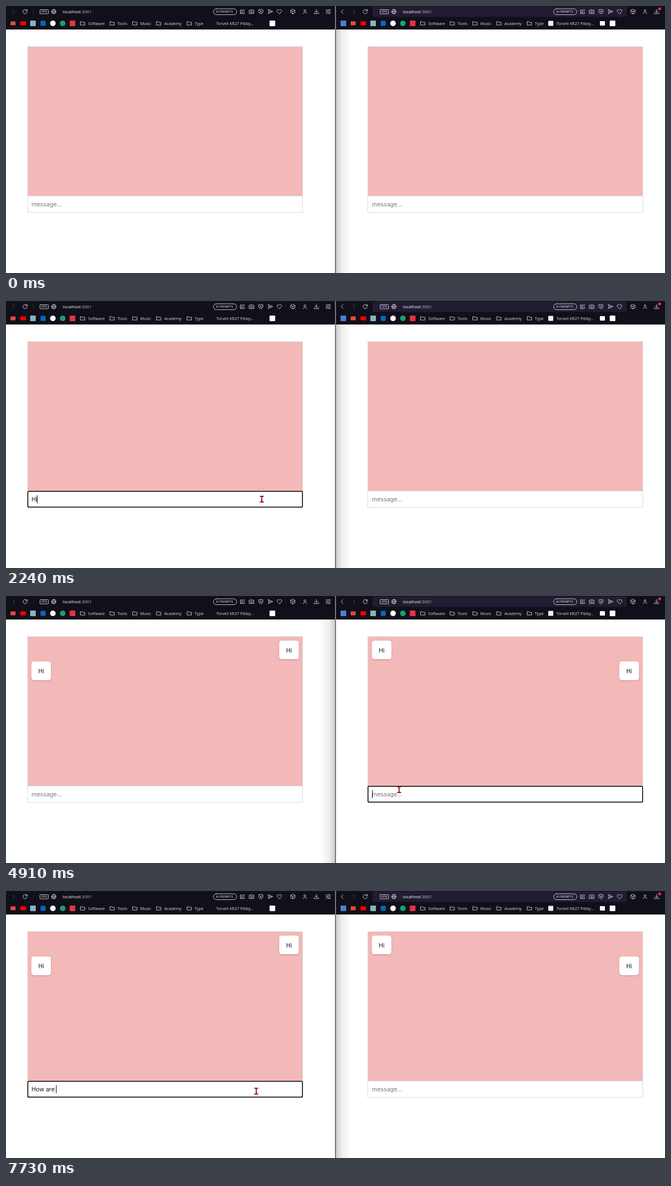
Recreate the animation shown at these times as an HTML page. Size 1174 px wide and 477 px high, loop 8 s.

```html
<!DOCTYPE html>
<html lang="en">
<head>
<meta charset="utf-8">
<title>Chat in two windows</title>
<style>
html, body { margin: 0; width: 100%; height: 100%; overflow: hidden; background: #fff; }
svg { display: block; }
text { white-space: pre; }
.ui { font: 7.2px "Open Sans", "Noto Sans", sans-serif; fill: #dcdbe2; }
.url { font-size: 7.7px; fill: #fff; }
.tag { font: 5px Inter, sans-serif; fill: #e4e3ea; }
.chat { font: 10.5px Inter, sans-serif; fill: #1c1c1c; }
.icon { fill: none; stroke: #d2d1d9; stroke-width: .9; stroke-linecap: round; stroke-linejoin: round; }
.field { fill: #fff; stroke: #dcdcdc; }
</style>
</head>
<body>
<svg id="stage" width="1174" height="477" viewBox="0 0 1174 477">
  <defs>
    <linearGradient id="fade">
      <stop offset="0" stop-color="#000" stop-opacity=".2"/>
      <stop offset=".4" stop-color="#000" stop-opacity=".07"/>
      <stop offset="1" stop-color="#000" stop-opacity="0"/>
    </linearGradient>
    <filter id="soft" x="-20%" y="-20%" width="140%" height="150%">
      <feDropShadow dx="0" dy="1" stdDeviation=".8" flood-opacity=".25"/>
    </filter>
  </defs>
</svg>
<script>
const LOOP = 8000, GAP = 606, TEXT_GAP = 606.5, BLINK = 530;
const stage = document.getElementById('stage');
const $ = id => document.getElementById(id);

const icon = (x, y, d, extra = '') => `<path class="icon" transform="translate(${x} ${y})" d="${d}" ${extra}/>`;
const label = (x, y, s, cls = 'ui') => `<text class="${cls}" x="${x}" y="${y}">${s}</text>`;
const square = (x, color, w = 10, h = w) =>
  `<rect x="${x - w / 2}" y="${31 - h / 2}" width="${w}" height="${h}" rx="1" fill="${color}"/>`;
const dot = (x, color) => `<circle cx="${x}" cy="31" r="5" fill="${color}"/>`;
const folder = (x, name, tx) =>
  icon(x, 31, 'M0 2.5V-3H3L4 -1.8H8V3H.5Z') + label(tx, 33.5, name);

function toolbar() {
  return icon(34, 10, 'M3.5 -1.6A3.8 3.8 0 1 0 3.8 .6M3.8 -4V-1.4H1.2') +
    '<rect class="icon" x="60.5" y="6.5" width="15" height="7.5" rx=".8"/>' +
    label(62.6, 12.2, 'VPN', 'tag') +
    icon(85, 10, 'M-4 0A4 4 0 1 1 4 0A4 4 0 1 1 -4 0H4M0 -4C-2.4 -2 -2.4 2 0 4C2.4 2 2.4 -2 0 -4') +
    label(101, 13, 'localhost<tspan fill="#bdbcc6">:3001</tspan>', 'ui url') +
    '<rect class="icon" x="369.5" y="5" width="41.5" height="10.5" rx="5.2"/>' +
    label(374, 12.1, 'AI PROMPTS', 'tag') +
    icon(421, 10, 'M-.5 -3H-3.5V3.5H3.5V1M-1.5 1.5L-1 -.5L2.5 -4L4 -2.5L.5 1Z') +
    icon(437.5, 10, 'M-4 -2.4H-2L-1.2 -3.6H1.2L2 -2.4H4V3.4H-4ZM-1.7 .4A1.7 1.7 0 1 1 1.7 .4A1.7 1.7 0 1 1 -1.7 .4') +
    icon(454, 10, 'M-3.6 -3.2L0 -4L3.6 -3.2V1Q3 3 0 4Q-3 3 -3.6 1ZM-1.4 -1.4L1.4 1.4M1.4 -1.4L-1.4 1.4') +
    icon(471, 10, 'M-4 -3.6L4.2 0L-4 3.6L-2.6 0ZM-2.6 0H1') +
    icon(487, 10, 'M0 4L-3.6 .4C-5.6 -2.5 -2 -5.4 0 -2.4C2 -5.4 5.6 -2.5 3.6 .4Z') +
    icon(511, 10, 'M0 -4.2L3.8 -2.2V2.2L0 4.2L-3.8 2.2V-2.2ZM-3.8 -2.2L0 0L3.8 -2.2M0 0V4.2') +
    icon(532.5, 10, 'M-1.7 -1.6A1.7 1.7 0 1 1 1.7 -1.6A1.7 1.7 0 1 1 -1.7 -1.6M-3 3.6C-3 .4 3 .4 3 3.6') +
    icon(553, 10, 'M0 -4V1.4M-2.3 -.7L0 1.5L2.3 -.7M-4 1.6V3.7H4V1.6') +
    icon(12, 10, 'M0 -3.5L3.5 0L0 3.5', 'style="stroke:#55535f"') +
    square(12.5, '#e34a3e', 9, 7) + square(30.5, '#f00', 10, 7) + square(48, '#86b4bd') +
    square(66, '#0a66c2', 9) + dot(83.5, '#fff') + dot(101, '#1c9f6c') + square(118.5, '#e5333f', 10) +
    folder(132.5, 'Software', 146.3) + folder(185, 'Tools', 198.5) + folder(225.5, 'Music', 239) +
    folder(268, 'Academy', 282) + folder(322.5, 'Type', 336) +
    label(374.5, 33.5, 'Torvell KR27 Pibby...') + square(474.5, '#fff', 10);
}

const bubble = (id, x, y) => `<g id="${id}" transform="translate(${x} ${y})">
  <rect width="34.7" height="33.2" rx="4.5" fill="#fff" filter="url(#soft)"/>
  <text class="chat" x="17.3" y="20.8" text-anchor="middle">Hi</text></g>`;

const panel = (side, dx, tx) => `
  <rect x="${38.5 + dx}" y="72.5" width="490" height="267" fill="#f3b8b8" stroke="#dcdcdc"/>
  <rect id="field${side}" class="field" x="${38.5 + dx}" y="339.5" width="490" height="29.2"/>
  <rect id="ring${side}" x="${38.9 + dx}" y="339.9" width="489.2" height="28.4" rx="1.8" fill="#fff" stroke="#000" stroke-width="1.5"/>
  <text id="text${side}" class="chat" x="${45.5 + tx}" y="358"></text>
  <rect id="caret${side}" y="347" width="1" height="14.5" fill="#111"/>`;

stage.insertAdjacentHTML('beforeend', `
  <rect width="1174" height="477" fill="#fff"/>
  <rect id="shadeR" x="588" y="42" width="26" height="435" fill="url(#fade)"/>
  <rect id="shadeL" x="-586" y="42" width="26" height="435" fill="url(#fade)" transform="scale(-1 1)"/>
  <rect width="1174" height="42" fill="#110f19"/>
  <rect x="653" y="1" width="453" height="18.5" rx="2.5" fill="#211c31"/>
  <path d="M48.5 6V14M498.5 6V14" stroke="#211f2b"/>
  ${toolbar()}
  ${icon(574, 10, 'M-4 -3H4M-4 0H4M-4 3H4M2 -3.8V-2.2M-2 -.8V.8M1.5 2.2V3.8')}
  <g transform="translate(${GAP} 0)">${toolbar()}</g>
  ${icon(600.5, 10, 'M0 -3.5L-3.5 0L0 3.5')}
  <circle cx="1164.5" cy="5" r="2.6" fill="#f0323c"/>
  ${square(601, '#4a7fd6')}${square(970.5, '#eee', 9)}${square(1062.5, '#fff', 9, 8)}
  <rect x="586" width="2" height="477" fill="#77767b"/>
  ${panel('L', 0, 0)}${panel('R', GAP, TEXT_GAP)}
  ${bubble('sentL', 486.8, 79.8)}${bubble('gotR', 45.3 + TEXT_GAP, 79.8)}
  ${bubble('gotL', 45.3, 117)}${bubble('sentR', 486.8 + GAP, 117)}
  <g id="mouse">
    <circle id="click" r="9.3" fill="#fcf04c" fill-opacity=".88"/>
    <path id="arrow" d="M.5 0V10.6L2.9 8.5L4.7 12.2L6.8 11.2L5 7.7H8Z" fill="#e5080c" stroke="#1a0000" stroke-width=".9"/>
    <path id="beam" d="M-3.5 -5.2H3.5M0 -5.2V5.2M-3.5 5.2H3.5" fill="none" stroke-width="1.8"/>
  </g>`);

// Typed text per field: [time, content]
const typing = {
  L: [[0, ''], [2110, 'H'], [2240, 'Hi'], [2500, ''], [6580, 'H'], [6860, 'Ho'], [7050, 'How'],
      [7190, 'How '], [7330, 'How a'], [7460, 'How ar'], [7590, 'How are'], [7730, 'How are ']],
  R: [[0, ''], [4240, 'H'], [4440, 'Hi'], [4910, '']]
};
const focus = [[0, ''], [1370, 'L'], [3450, 'R'], [5850, 'L']];
const blinkStarts = [1370, 2110, 2240, 3450, 4240, 4440, 5850, 6580, 6860, 7050, 7190, 7330, 7460, 7590, 7730];
const clicks = [[1370, 1510], [3450, 3510], [5850, 5920]];

// Pointer moves: start, step length, step count, waypoints [progress, x, y]
const moves = [
  [390, 65.5, 13, [[0, 1112, 468], [.32, 915, 442], [.75, 559, 394.7], [.84, 515, 381], [.92, 486, 370], [1, 468, 359.5]]],
  [1240, 65, 2, [[0, 459, 355], [1, 455.7, 354]]],
  [3110, 67, 5, [[0, 480, 353], [.5, 606, 349], [1, 700.3, 346]]],
  [5580, 67, 4, [[0, 655, 348], [.5, 530, 353], [1, 445.8, 357.5]]]
];

const latest = (list, t) => list.filter(k => k[0] <= t).pop();

function pointer(t) {
  const move = latest(moves, t);
  if (!move) return null;
  const [start, step, count, way] = move;
  const p = Math.min(Math.floor((t - start) / step), count - 1) / (count - 1);
  const i = Math.max(1, way.findIndex(w => w[0] >= p));
  const a = way[i - 1], b = way[i], k = (p - a[0]) / (b[0] - a[0]);
  return [a[1] + (b[1] - a[1]) * k, a[2] + (b[2] - a[2]) * k];
}

const show = (id, on) => $(id).setAttribute('visibility', on ? 'visible' : 'hidden');

function drawField(side, t, active) {
  const text = latest(typing[side], t)[1], node = $('text' + side), on = active === side;
  const x = 45.5 + (side === 'R' ? TEXT_GAP : 0);
  node.textContent = text || 'message...';
  node.style.fill = text ? '#151515' : '#777';
  show('ring' + side, on);
  const since = t - blinkStarts.filter(s => s <= t).pop();
  show('caret' + side, on && Math.floor(since / BLINK) % 2 === 0);
  $('caret' + side).setAttribute('x', Math.floor(x + (text ? node.getComputedTextLength() : 0)));
}

function drawPointer(t) {
  const pos = pointer(t);
  const pressed = !!pos && clicks.some(([a, b]) => t >= a && t < b);
  const [x, y] = pos || [0, 0];
  const overField = y > 339 && y < 369 && (x > 38 && x < 529 || x > 644 && x < 1135);
  $('mouse').setAttribute('transform', `translate(${x} ${y})`);
  show('click', pressed);
  show('arrow', pos && !overField);
  show('beam', pos && overField);
  $('beam').setAttribute('stroke', pressed ? '#5c552c' : '#7d0a10');
}

function draw(t) {
  const active = latest(focus, t)[1];
  drawField('L', t, active);
  drawField('R', t, active);
  show('shadeL', active === 'R');
  show('shadeR', active !== 'R');
  for (const id of ['sentL', 'gotR']) show(id, t >= 2500);
  for (const id of ['gotL', 'sentR']) show(id, t >= 4910);
  drawPointer(t);
}

const begin = performance.now();
function frame(now) {
  draw(Math.max(0, now - begin) % LOOP);
  requestAnimationFrame(frame);
}
draw(0);
requestAnimationFrame(frame);
</script>
</body>
</html>
```
